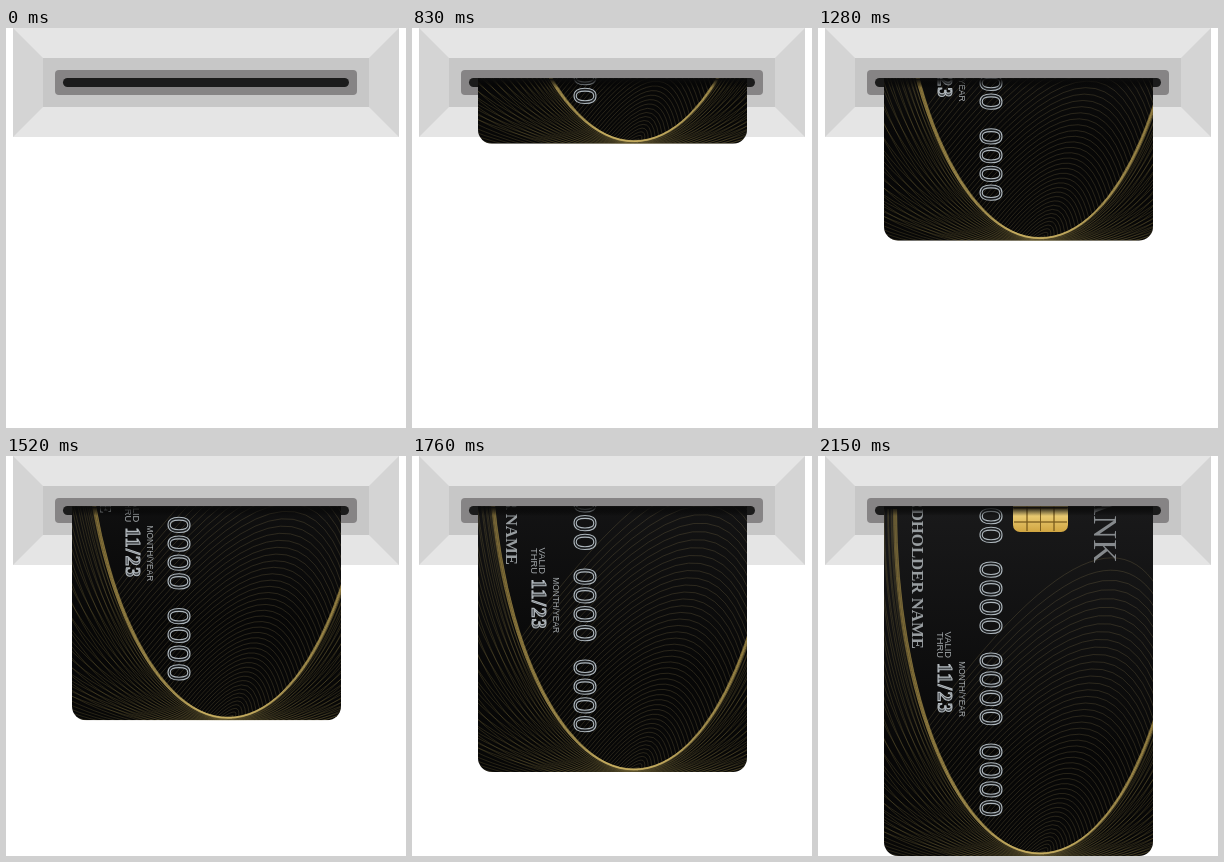
An HTML page with a canvas for the animation above (2820 ms loop, 400 by 400 pixels).

```html
<!DOCTYPE html>
<html>
<head>
<meta charset="utf-8">
<style>
html, body { margin: 0; width: 100%; height: 100%; overflow: hidden; background: #fff }
canvas { display: block }
</style>
</head>
<body>
<canvas id="stage" width="400" height="400"></canvas>
<script>
const ctx = document.getElementById('stage').getContext('2d');
const SERIF = '"Liberation Serif", serif', SANS = '"Liberation Sans", sans-serif';
const START = 560, STEP = 30, STEPS = 53, SPEED = 6.46, LOOP = 2820;
const LEFT = 66, RIGHT = 335, BOTTOM = 400, SLOT = 50;
// The bright curve is the lower half of this ellipse.
const BOW = { x: 222, y: 53, rx: 145, ry: 344 };

function fade(y0, y1, ...colors) {
  const g = ctx.createLinearGradient(0, y0, 0, y1);
  colors.forEach((c, i) => g.addColorStop(i / (colors.length - 1), c));
  return g;
}

function box(x0, y0, x1, y1, r, fill) {
  ctx.fillStyle = fill;
  ctx.beginPath();
  ctx.roundRect(x0, y0, x1 - x0, y1 - y0, r);
  ctx.fill();
}

function repeat(count, fn) {
  for (let i = 0; i < count; i++) fn(i / (count - 1));
}

function machine() {
  box(7, 0, 393, 109, 0, '#e5e5e5');
  ctx.fillStyle = '#d4d4d4';
  for (const x of [7, 393]) {
    const inner = x + (x < 200 ? 30 : -30);
    ctx.beginPath();
    ctx.moveTo(x, 0);
    ctx.lineTo(inner, 30);
    ctx.lineTo(inner, 79);
    ctx.lineTo(x, 109);
    ctx.fill();
  }
  box(37, 30, 363, 79, 0, '#c7c7c7');
  box(49, 42, 351, 67, 4, '#868485');
  box(57, SLOT, 343, 59, 4.5, '#1b1b1b');
}

function bow(drift, rx, ry) {
  ctx.beginPath();
  ctx.ellipse(BOW.x + drift, BOW.y, rx, ry, 0, 0, Math.PI);
  ctx.stroke();
}

function bowPoint(angle) {
  return [BOW.x + BOW.rx * Math.cos(angle), BOW.y + BOW.ry * Math.sin(angle)];
}

function waves() {
  ctx.lineWidth = .6;
  // Arches spanning the bow, flattening towards its foot
  ctx.strokeStyle = 'rgba(165,148,95,.36)';
  repeat(50, u => {
    const mid = Math.PI / 2, ease = Math.pow(u, .8);
    ctx.beginPath();
    ctx.moveTo(...bowPoint(mid + .9 * (1 - u)));
    ctx.quadraticCurveTo(310 - 80 * u, -10 + 410 * ease, ...bowPoint(mid - 1.2 * (1 - u)));
    ctx.stroke();
  });
  // Two fans opening outside the bow
  ctx.strokeStyle = 'rgba(178,154,85,.32)';
  for (const drift of [-25, 45])
    repeat(26, u => bow(drift * u, BOW.rx + 300 * u * u, BOW.ry + 18 * u));
  ctx.strokeStyle = fade(50, BOTTOM, '#7d6b38', '#a58a41', '#d6bb68');
  repeat(4, u => bow(0, BOW.rx - 1.5 + 3 * u, BOW.ry + u));
}

function chip() {
  box(195, 36, 250, 76, 7, fade(36, 76, '#c79d38', '#efd27c', '#d0a541'));
  ctx.strokeStyle = '#7a5c1c';
  ctx.lineWidth = .8;
  ctx.beginPath();
  for (const x of [209, 222.5, 236]) ctx.rect(x, 40, 0, 35);
  for (const y of [52, 66]) ctx.rect(196, y, 53, 0);
  ctx.stroke();
}

// Sideways text that reads downwards and ends at y
function label(text, x, y, font, { fill = '#a3a8ab', edge, spacing = 0, gap = 0 } = {}) {
  ctx.save();
  ctx.translate(x, y);
  ctx.rotate(Math.PI / 2);
  ctx.font = font;
  ctx.textAlign = 'right';
  ctx.letterSpacing = spacing + 'px';
  ctx.wordSpacing = gap + 'px';
  ctx.fillStyle = fill;
  ctx.fillText(text, 0, 0);
  if (edge) {
    ctx.strokeStyle = edge;
    ctx.lineWidth = 1.1;
    ctx.strokeText(text, 0, 0);
  }
  ctx.restore();
}

function print() {
  const hollow = { fill: '#4b4f52', edge: '#b2b9be' };
  label('0000 0000 0000 0000', 162, 362, '32px ' + SANS, { fill: '#1b1d1f', edge: '#aeb7bd', spacing: 1, gap: 6 });
  label('BANK', 276, 107, '33px ' + SERIF, { fill: '#85898c' });
  label('CARDHOLDER NAME', 93.5, 193, 'bold 16.8px ' + SERIF, { fill: '#989da0' });
  label('11/23', 120, 258, 'bold 20px ' + SERIF, { ...hollow, spacing: 1.3 });
  label('VALID', 127, 202, '9.4px ' + SANS);
  label('THRU', 119, 202, '9.4px ' + SANS);
  label('MONTH/YEAR', 140.5, 261, '8.4px ' + SANS);
}

function card(step) {
  ctx.save();
  ctx.beginPath();
  ctx.rect(0, SLOT + .5, 400, 400);
  ctx.clip();
  ctx.save();
  ctx.translate(0, (step - STEPS) * SPEED);
  ctx.beginPath();
  ctx.roundRect(LEFT, -28, RIGHT - LEFT, BOTTOM + 28, 14);
  ctx.clip();
  box(LEFT, -28, RIGHT, BOTTOM, 0, fade(30, 300, '#1b1b1c', '#070707'));
  waves();
  chip();
  print();
  ctx.restore();
  if (step > 0) box(LEFT, SLOT, RIGHT, 60, 0, fade(SLOT + 1, 60, '#0c0c0c', 'rgba(0,0,0,0)'));
  ctx.restore();
}

function draw(time) {
  const step = Math.min(STEPS, Math.floor((time % LOOP - START) / STEP));
  ctx.clearRect(0, 0, 400, 400);
  machine();
  if (step >= 0) card(step);
}

const origin = performance.now();
function tick() {
  draw(performance.now() - origin);
  requestAnimationFrame(tick);
}
tick();
</script>
</body>
</html>
```
